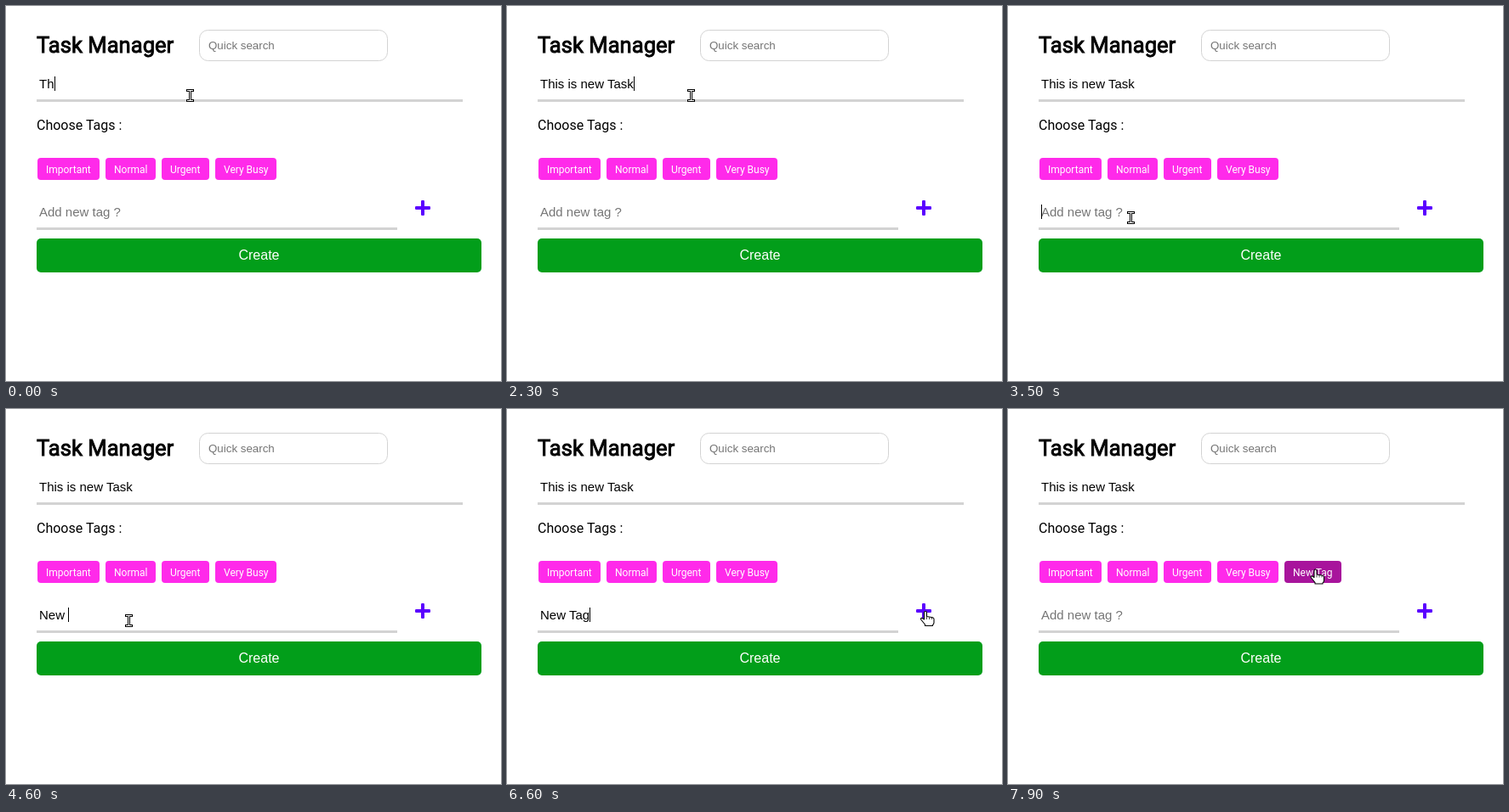
Recreate the animation shown at these times as an HTML page. Size 582 by 442 pixels, loop 8000 ms.

```html
<!DOCTYPE html>
<html lang="en">
<head>
<meta charset="utf-8">
<title>Task form</title>
<style>
  html, body { margin: 0; width: 100%; height: 100%; overflow: hidden; background: #fff; }
  svg { display: block; width: 582px; height: 442px; }
  text { font-family: "Liberation Sans", Arial, sans-serif; white-space: pre; }
  .roboto, .tag text { font-family: Roboto, sans-serif; }
  .title { font-size: 25.6px; stroke: #000; stroke-width: .9px; }
  .label { font-size: 16px; }
  .field { font-size: 15px; }
  .hint { fill: #757575; }
  .search { font-size: 13.333px; }
  .line { fill: #d3d3d3; }
  .tag rect { fill: #ff2aea; }
  .tag text { fill: #fff; font-size: 12px; }
  .tag.picked rect { fill: #a8149c; }
  .create { fill: #fff; font-size: 16px; text-anchor: middle; }
  .outline { fill: #fff; stroke: #000; stroke-width: 1.1; stroke-linejoin: round; }
</style>
</head>
<body>
<svg viewBox="0 0 582 442">
  <text class="roboto title" x="36" y="55">Task Manager</text>
  <rect x="227.5" y="28.5" width="221" height="36" rx="10" fill="#fff" stroke="#d3d3d3"/>
  <text class="search hint" x="238" y="51">Quick search</text>

  <text class="field" id="task" x="39" y="97"></text>
  <rect class="line" x="36" y="110" width="501" height="3"/>
  <text class="roboto label" x="36" y="146">Choose Tags :</text>
  <g id="tags"></g>

  <text class="field" id="newTag" x="39" y="248"></text>
  <rect class="line" x="36" y="261" width="424" height="3"/>
  <g id="plus" fill="#5a00ff">
    <rect x="481" y="236" width="18" height="4" rx="1.2"/>
    <rect x="488" y="229" width="4" height="18" rx="1.2"/>
  </g>

  <rect x="36" y="274" width="523" height="40" rx="5" fill="#029e1a"/>
  <text class="create" x="297.5" y="299">Create</text>
  <rect id="caret" width="1" height="17"/>

  <g id="beam" fill="none" stroke-linecap="square">
    <path d="M-3-6H3M0-6V6M-3 6H3" stroke="#000" stroke-width="3"/>
    <path d="M-3-6H3M0-6V6M-3 6H3" stroke="#fff"/>
  </g>
  <path id="arrow" class="outline" d="M0 0V16l4-3.5 2.5 6 2.5-1-2.5-6h5z"/>
  <g id="hand">
    <path class="outline" d="M-1.5 10V2a1.5 1.5 0 0 1 3 0V6.5l7 1.2q1.5 .5 1.5 2v4q0 1.5-1.5 3v.8h-9v-1.5l-4.5-5.5q-1.2-2 .8-2.2z"/>
    <path d="M1.5 7v3M4.5 7.5v2.5M7.5 8v2" stroke="#000" stroke-width=".7"/>
  </g>
</svg>
<script>
const LOOP = 8000;
const $ = id => document.getElementById(id);
const pen = document.createElement("canvas").getContext("2d");
pen.font = '15px "Liberation Sans", Arial, sans-serif';

// Typed text and the time of each key press
const task = { text: "This is new Task",
  keys: [0, 0, 100, 300, 500, 600, 700, 800, 1000, 1100, 1200, 1300, 1900, 2000, 2100, 2300] };
const newTag = { text: "New Tag", keys: [4200, 4300, 4500, 4600, 5100, 5300, 5500] };
const ADDED = 6900, PICKED = 7900, TASK_BLUR = 3500;

// [from, to] spans in which the caret is lit
const lit = [[0, 2800], [3300, 4100], [4200, 6100], [6600, ADDED]];

// [time, shape, x, y]
const pointer = [
  [0, "beam", 216.5, 105.5],
  [2900, "arrow", 207, 118], [3000, "arrow", 196, 142], [3100, "arrow", 182, 170],
  [3200, "hand", 168, 190], [3300, "arrow", 155, 216], [3400, "beam", 147.5, 242.5],
  [3500, "beam", 144.5, 249.5],
  [6100, "beam", 177.5, 249.5], [6200, "beam", 245.5, 254.5], [6300, "beam", 325.5, 257.5],
  [6400, "beam", 405.5, 257.5], [6500, "arrow", 466, 262], [6600, "hand", 492, 238],
  [6700, "hand", 493, 236], [6900, "hand", 488.5, 234.5],
  [7300, "arrow", 455, 221], [7400, "arrow", 405, 206], [7500, "hand", 361.5, 188.5]
];

// [time, angle]
const spin = [[0, 0], [6900, 5], [7000, 10], [7100, 14], [7400, 0]];

const at = (steps, t) => steps.findLast(s => s[0] <= t);
const typed = (field, t) => field.text.slice(0, field.keys.filter(k => k <= t).length);

function addTag(name, x, width) {
  $("tags").insertAdjacentHTML("beforeend",
    `<g class="tag"><rect x="${x}" y="179" width="${width}" height="26" rx="4"/>` +
    `<text x="${x + 10}" y="197">${name}</text></g>`);
  return $("tags").lastElementChild;
}
addTag("Important", 37, 73);
addTag("Normal", 117, 59);
addTag("Urgent", 183, 56);
addTag("Very Busy", 246, 72);
const added = addTag("New Tag", 325, 67);

const show = (el, on) => el.setAttribute("visibility", on ? "visible" : "hidden");

function draw(t) {
  const taskText = typed(task, t);
  const tagText = t < ADDED ? typed(newTag, t) : "";
  $("task").textContent = taskText;
  $("newTag").textContent = tagText || "Add new tag ?";
  $("newTag").classList.toggle("hint", !tagText);

  const inTask = t < TASK_BLUR;
  $("caret").setAttribute("x", Math.round(39 + pen.measureText(inTask ? taskText : tagText).width));
  $("caret").setAttribute("y", inTask ? 83 : 234);
  show($("caret"), lit.some(([from, to]) => t >= from && t < to));

  show(added, t >= ADDED);
  added.classList.toggle("picked", t >= PICKED);
  $("plus").setAttribute("transform", `rotate(${at(spin, t)[1]} 490 238)`);

  const [, shape, x, y] = at(pointer, t);
  for (const id of ["beam", "arrow", "hand"]) show($(id), id === shape);
  $(shape).setAttribute("transform", `translate(${x} ${y})`);
}

function tick() {
  draw(performance.now() % LOOP);
  requestAnimationFrame(tick);
}
tick();
</script>
</body>
</html>
```
